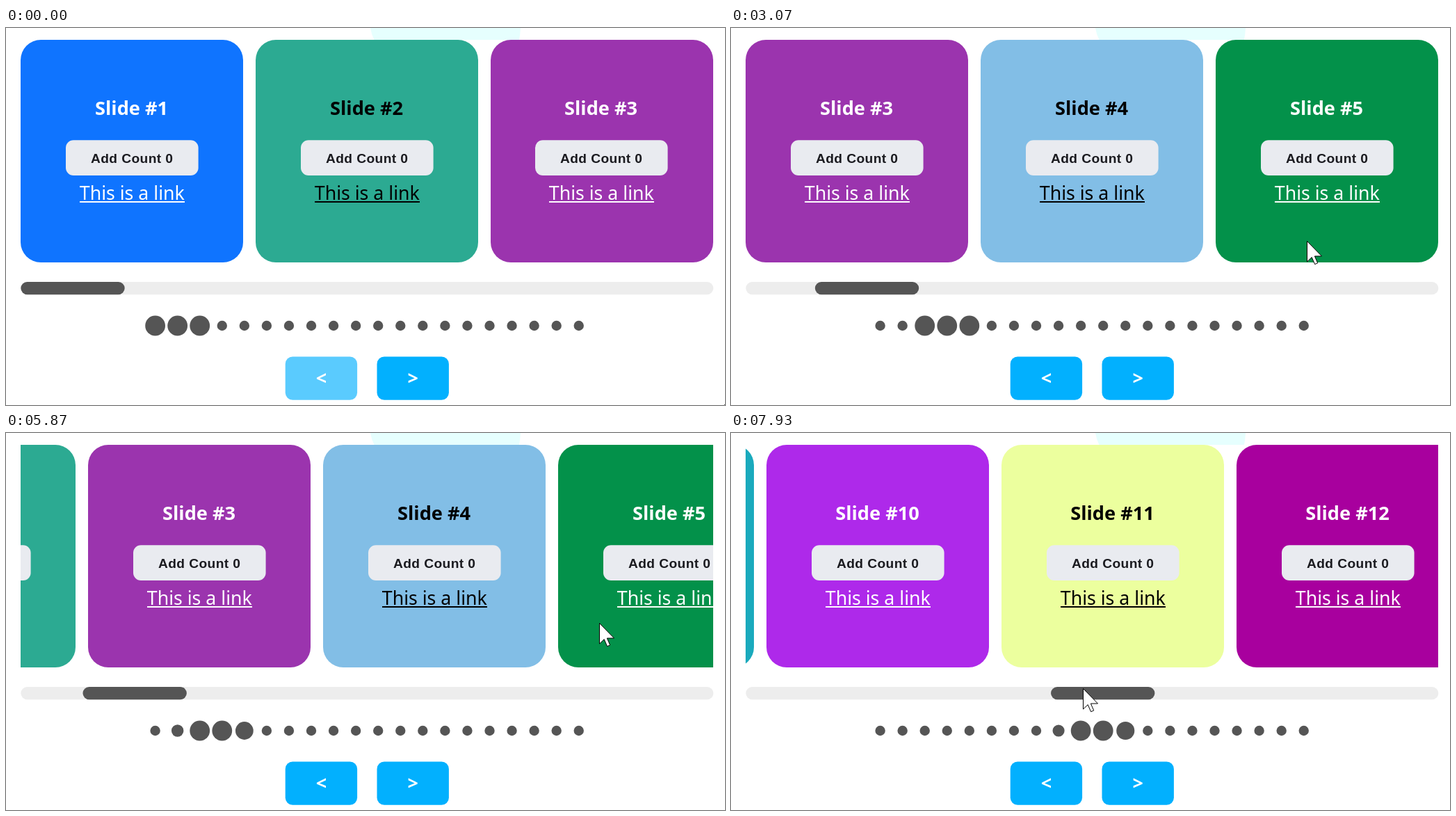
Write an HTML page that moves like this. It is 1034x542 px and loops after 8000 ms.

```html
<!DOCTYPE html>
<html lang="en">
<head>
<meta charset="utf-8">
<title>Slider</title>
<style>
html, body { margin: 0; width: 100%; height: 100%; overflow: hidden; background: #fff; }
svg { display: block; width: 1034px; height: 542px; }
text { text-anchor: middle; white-space: pre; }
.title { font: 700 27.2px "Noto Sans", "Open Sans", sans-serif; }
.label { font: 700 19.2px "Liberation Sans", Arial, sans-serif; letter-spacing: .4px; fill: #1b1b20; }
.link { font: 400 26.7px "Noto Sans", "Open Sans", sans-serif; }
.arrow { font: 700 27px "Noto Sans", "Open Sans", sans-serif; fill: #fff; }
</style>
</head>
<body>
<svg viewBox="0 0 1034 542">
  <clipPath id="view"><rect x="21" y="17" width="996" height="320"/></clipPath>
  <path d="M524 0Q525.5 9 529.5 17H738Q739.5 9 740 0Z" fill="#e6fffe"/>
  <g id="cards" clip-path="url(#view)"></g>
  <rect x="21.3" y="365" width="996" height="18.2" rx="9.1" fill="#ededed"/>
  <rect id="thumb" y="365" width="149.4" height="18.2" rx="9.1" fill="#555"/>
  <g id="dots" fill="#555"></g>
  <g id="nav"></g>
  <path id="cursor" d="M.5 .5V30L7.2 23.6L11.6 33.7L15.7 31.9L11.4 22H21.5Z" fill="#fff" stroke="#000"/>
</svg>
<script>
const LOOP = 8000, STEP = 1000 / 15, LAG = 0.23;
const LEFT = 21.3, PITCH = 337.9, SLIDES = 20, SHOWN = 3;
const byId = id => document.getElementById(id);

function add(parent, tag, attrs, text) {
  const el = document.createElementNS("http://www.w3.org/2000/svg", tag);
  for (const name in attrs) el.setAttribute(name, attrs[name]);
  if (text) el.textContent = text;
  parent.append(el);
  return el;
}

const place = (el, x, y) => el.setAttribute("transform", `translate(${x} ${y})`);

const FILLS = ["#0f74ff", "#2caa92", "#9b34ae", "#82bee6", "#03914a", "#f60fec",
  "#30f71a", "#f08a24", "#1aaabd", "#ae29ea", "#ecff9e", "#a8009e"];
const DARK_INK = [2, 4, 7, 8, 11];

const cards = FILLS.map((fill, i) => {
  const ink = DARK_INK.includes(i + 1) ? "#000" : "#fff";
  const panel = add(byId("cards"), "rect", { y: 17, width: 320, height: 320, rx: 29, fill });
  const content = add(byId("cards"), "g", { fill: ink });
  add(content, "text", { x: 94.6, y: 125, class: "title" }, "Slide #" + (i + 1));
  add(content, "rect", { y: 161.3, width: 190.6, height: 50.7, rx: 11, fill: "#e9ebf0" });
  add(content, "text", { x: 95.2, y: 193.5, class: "label" }, "Add Count 0");
  add(content, "text", { x: 95.3, y: 247, class: "link" }, "This is a link");
  add(content, "rect", { x: 20, y: 249, width: 151, height: 2 });
  return { panel, content };
});

const dots = Array.from({ length: SLIDES }, (_, i) =>
  add(byId("dots"), "circle", { cx: 214.6 + i * 32.06, cy: 428 }));

const [prev] = [[401.7, "<"], [533.5, ">"]].map(([x, sign]) => {
  const button = add(byId("nav"), "g", {});
  add(button, "rect", { x, y: 472.5, width: 103.4, height: 62.3, rx: 10.5, fill: "#02b0fe" });
  add(button, "text", { x: x + 51.7, y: 512.7, class: "arrow" }, sign);
  return button.firstChild;
});

// Each move is [start, end, ...values], in steps of 1/15 s, eased from the values before it.
const drags = [
  [30, 43.65, 1.998], [47, 57, 2.998], [70, 79, 4],
  [80, 91.71, 1], [92, 102.69, 4], [107, 123.48, 10]
];
const pointerMoves = [
  [3, 7, 627, 365], [13, 23, 795, 295], [24, 28, 807, 301],
  [30, 40, 366, 293], [40, 46, 828, 306],
  [47, 54, 480, 300], [57, 69, 820, 305],
  [70, 78, 400, 298], [80, 88, 853, 273],
  [90, 100, 674, 378], [100, 107, 265, 372], [107, 123.48, 559, 366]
];

const clamp = u => Math.max(0, Math.min(1, u));
const ease = u => u * u * (3 - 2 * u);

function follow(moves, from, t) {
  return moves.reduce((at, [start, end, ...to]) => {
    const u = ease(clamp((t - start) / (end - start)));
    return at.map((v, i) => v + (to[i] - v) * u);
  }, from);
}

function draw(now) {
  const step = Math.floor((now % LOOP + 5) / STEP);
  const [slide] = follow(drags, [0], step);
  const [late] = follow(drags, [0], step - LAG);
  const [x, y] = follow(pointerMoves, [1033, 541], step);

  cards.forEach(({ panel, content }, i) => {
    const left = LEFT + (i - slide) * PITCH;
    place(panel, Math.floor(left), 0);
    place(content, Math.floor(left + 64.8), 0);
  });
  byId("thumb").setAttribute("x", LEFT + late * 996 / SLIDES);
  dots.forEach((dot, i) => {
    const seen = clamp(Math.min(i + 1 - late, late + SHOWN - i));
    dot.setAttribute("r", 7.2 * (1 + seen));
  });
  prev.setAttribute("opacity", slide > 0 ? 1 : .65);
  place(byId("cursor"), Math.round(x), Math.round(y));
}

const start = performance.now();
function tick() {
  draw(performance.now() - start);
  requestAnimationFrame(tick);
}
tick();
</script>
</body>
</html>
```
